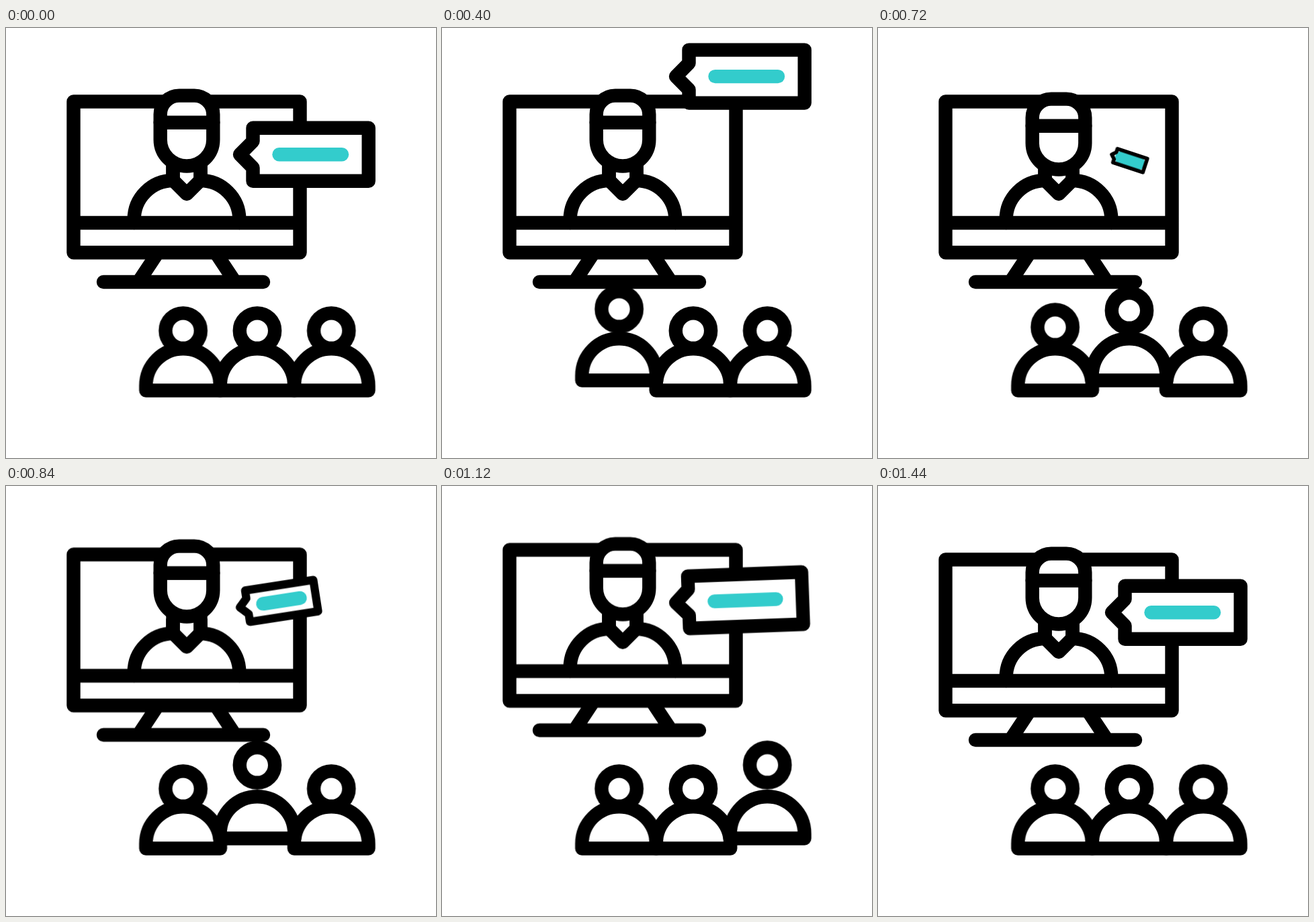
Animation, 640 px wide and 640 px high, one loop 1.68 s. Source, as an HTML page:

```html
<!DOCTYPE html>
<html lang="en">
<head>
<meta charset="utf-8">
<title>Online lecture</title>
<style>
  html, body { margin: 0; width: 100%; height: 100%; overflow: hidden; background: #fff; }
  svg { display: block; width: 100vw; height: 100vh; }

  .ink {
    fill: none; stroke: #000; stroke-width: 20.4;
    stroke-linecap: round; stroke-linejoin: round;
  }
  .paper { fill: #fff; }
  .neck { stroke-linecap: butt; }

  /* smooth = ease in and out, with no speed at either end */
  svg {
    --loop: 1680ms infinite;
    --smooth: cubic-bezier(.333, 0, .667, 1);
    --in: cubic-bezier(.333, 0, .667, .333);
    --out: cubic-bezier(.333, .667, .667, 1);
  }

  .screen { animation: hop var(--loop) var(--smooth); }
  .face { animation: nod var(--loop) var(--smooth); }
  .bubble {
    transform-origin: 348px 188.3px;
    animation:
      leave var(--loop) var(--in),
      grow var(--loop) var(--out),
      swing var(--loop) var(--smooth);
  }
  .bubble * { vector-effect: non-scaling-stroke; }
  .teal { stroke: #33cccc; }

  .viewer { animation: rise var(--loop) var(--smooth) var(--wait); }
  .viewer circle { animation: stretch var(--loop) var(--smooth) var(--wait); }

  @keyframes hop {
    0%, 44.64% { transform: translateY(0); }
    55.36%, 65.48% { transform: translateY(-15px); }
    76.79%, 100% { transform: translateY(0); }
  }
  @keyframes nod {
    0%, 38.1% { transform: translateY(0); }
    44.64% { transform: translateY(6px); }
    56.55% { transform: translateY(-16px); }
    66.67%, 100% { transform: translateY(0); }
  }
  @keyframes leave {
    0%, 7.74% { translate: 0 0; }
    38.1% { translate: 0 -412px; }
    38.11%, 100% { translate: 0 0; }
  }
  @keyframes grow {
    0%, 38.1% { scale: 1; }
    38.11% { scale: 0; }
    70.9%, 100% { scale: 1; }
  }
  @keyframes swing {
    0%, 38.1% { rotate: 0deg; }
    38.11% { rotate: 28deg; }
    53.57% { rotate: -14.4deg; }
    70.9%, 100% { rotate: 0deg; }
  }
  @keyframes rise {
    0%, 10.71% { transform: translateY(0); }
    21.13%, 29.76% { transform: translateY(-15px); }
    41.07%, 100% { transform: translateY(0); }
  }
  @keyframes stretch {
    0%, 16.07% { transform: translateY(0); }
    26.49% { transform: translateY(-20.5px); }
    27.68% { transform: translateY(-20.5px); animation-timing-function: cubic-bezier(.39, 0, .69, .31); }
    45.06%, 100% { transform: translateY(0); }
  }
</style>
</head>
<body>
<svg viewBox="0 0 640 640">
  <defs>
    <path id="neck" class="neck" d="M248.5 199V226.5M289.5 199V226.5"/>
    <path id="balloon" d="M367.5 148.8H539.7V227.8H367.5V208L348 188.3L367.5 168.6Z"/>
    <path id="torso" d="M-55.3 539.5V532.5A55.3 55.3 0 0 1 55.3 532.5V539.5Z"/>
  </defs>

  <g class="ink">
    <g class="screen">
      <path d="M100.5 109.5H437.5V334.3H100.5ZM100.5 290H437.5"/>
      <path d="M226 334.3L197 378M312 334.3L341 378M145 378H383"/>
      <path d="M190.7 290V285A58 58 0 0 1 248.7 227M347.3 290V285A58 58 0 0 0 289.3 227"/>
      <path d="M248.5 226.5L269 247L289.5 226.5"/>
      <path class="neck" d="M248.5 205V226.5M289.5 205V226.5"/>
      <g class="face">
        <use href="#neck"/>
        <path class="paper" d="M229.7 128.6A28 28 0 0 1 257.7 100.6H280.3A28 28 0 0 1 308.3 128.6V166.2A39.3 39.3 0 0 1 229.7 166.2Z"/>
        <path d="M229.7 140.7H308.3"/>
      </g>
      <g class="bubble">
        <use href="#balloon" class="paper" stroke="none"/>
        <path class="teal" d="M406.5 188.3H500"/>
        <use href="#balloon"/>
      </g>
    </g>

    <g transform="translate(263.6)"><g class="viewer" style="--wait: 0ms">
      <use href="#torso"/><circle cy="450.6" r="26.2"/>
    </g></g>
    <g transform="translate(373.9)"><g class="viewer" style="--wait: 335ms">
      <use href="#torso"/><circle cy="450.6" r="26.2"/>
    </g></g>
    <g transform="translate(484.2)"><g class="viewer" style="--wait: 685ms">
      <use href="#torso"/><circle cy="450.6" r="26.2"/>
    </g></g>
  </g>
</svg>
</body>
</html>
```
